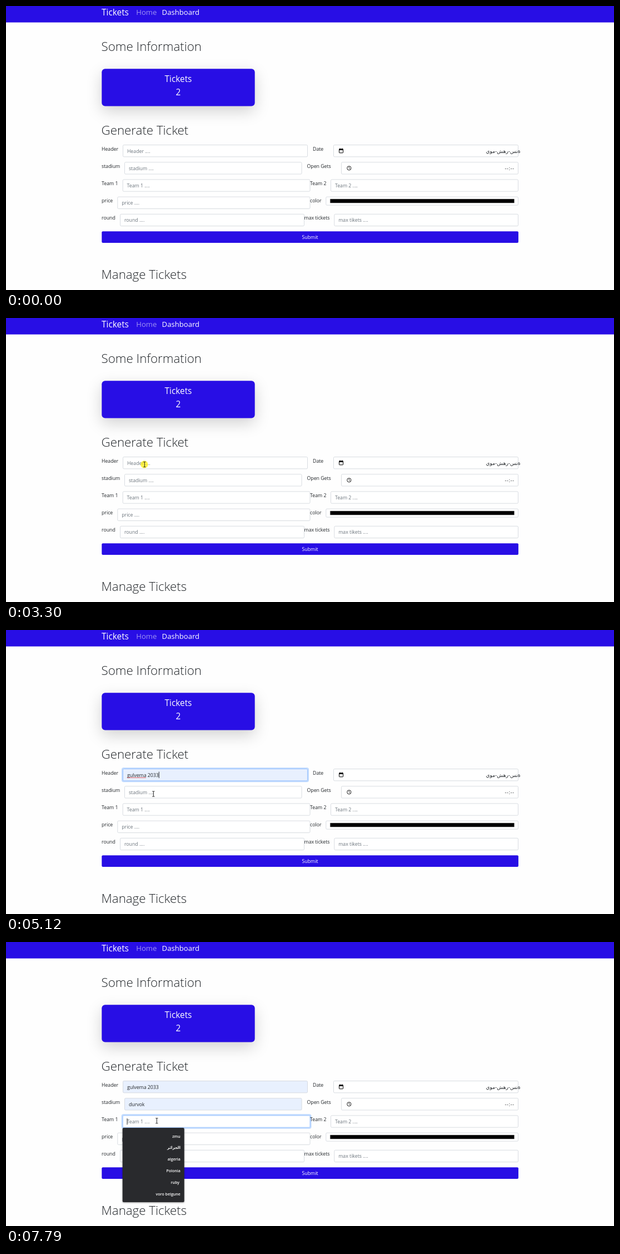
Animation, 1094 px wide and 512 px high, one loop 8 s. Source, as an HTML page with a canvas:

```html
<!DOCTYPE html>
<html lang="en">
<head>
<meta charset="utf-8">
<title>Tickets dashboard</title>
<style>
  html, body { margin: 0; width: 100%; height: 100%; overflow: hidden; background: #fefefe; }
  canvas { display: block; width: 1094px; height: 512px; }
</style>
</head>
<body>
<canvas id="stage"></canvas>
<script>
const W = 1094, H = 512, LOOP = 8000;
const BLUE = '#280ee5', INK = '#212529', HINT = '#6c757d', LINE = '#ced4da', FILLED = '#e8f0fe';
const SANS = '"Open Sans", "Noto Sans", "DejaVu Sans", sans-serif';
const BODY = 8.75, SMALL = 7.3;

const canvas = document.getElementById('stage');
const ctx = canvas.getContext('2d');
const dpr = window.devicePixelRatio || 1;
canvas.width = W * dpr;
canvas.height = H * dpr;

// label, label x, left, right, row, hint
const fields = [
  ['Header', 172, 210.5, 542.5, 0, 'Header ....'],
  ['stadium', 172, 213.5, 532, 1, 'stadium ....'],
  ['Team 1', 172, 210.2, 547, 2, 'Team 1 ....'],
  ['price', 172, 200.8, 547, 3, 'price ....'],
  ['round', 172, 205.5, 536.5, 4, 'round ....'],
  ['Date', 552, 589.5, 921.5, 0, ''],
  ['Open Gets', 541.5, 603.5, 921.5, 1, ''],
  ['Team 2', 547, 584.5, 921.5, 2, 'Team 2 ....'],
  ['color', 547, 575.8, 921.5, 3, ''],
  ['max tickets', 536.5, 590.8, 921.5, 4, 'max tikets ....']
].map(([label, lx, x, right, row, hint]) =>
  ({ label, lx, x, right, hint, y: 250.5 + row * 31.2, h: label === 'color' ? 15 : 21.3 }));

// What happens to the first three fields, in ms
const acts = [
  { focus: 3390, blur: 5650, hover: 4110, pick: 4580, shut: 4650, caret: 4650, spell: 4850,
    list: ['gulvema 2033', 'zefezfffezfezzf', 'ffeefezez', 'gulveam 2022', 'Gulveam 2100', 'gulvema 2032'] },
  { focus: 5650, blur: 7790, hover: 6740, pick: 7110, shut: 7180, caret: 7180, spell: LOOP,
    list: ['durvok', 'humdri', 'dorvunei', 'tolf', 'الباخرة', 'Lorem Ipsum  dddddd'] },
  { focus: 7790, blur: LOOP, hover: LOOP, pick: LOOP, shut: LOOP, caret: 7790, spell: LOOP,
    list: ['zmu', 'الجزائر', 'algeria', 'Polonia', 'ruby ', 'voro belgune'] }
];

const sweeps = [
  { from: 560, to: 1320, pts: [[1075, 461], [985, 320], [830, 160], [640, 60], [470, 8], [382, 34]] },
  { from: 1390, to: 2150, pts: [[364, 31], [320, 15], [252, 10], [200, 9], [203, 10], [213, 8]] },
  { from: 2220, to: 2970, pts: [[245, 15], [350, 42], [470, 88], [505, 142], [430, 212], [320, 250], [252, 262.5]] }
];
const stops = [
  [3030, 249.3, 264, 'beam'], [4040, 273, 279, 'arrow'], [4110, 271, 280.5, 'arrow'],
  [5050, 267, 287, 'beam'], [5120, 265.3, 295.5, 'beam'], [6640, 274, 311, 'arrow'],
  [6740, 272, 314, 'arrow'], [6790, 270, 311.5, 'arrow'], [7320, 271, 319, 'beam'],
  [7380, 271.3, 322.3, 'beam']
];
const clicks = [[3300, 3390], [4440, 4580], [5520, 5650], [6980, 7110], [7730, 7790]];

function text(str, x, y, size, color = INK, weight = 400, align = 'left', family = SANS) {
  ctx.font = `${weight} ${size}px ${family}`;
  ctx.fillStyle = color;
  ctx.textAlign = align;
  ctx.fillText(str, x, y);
  return ctx.measureText(str).width;
}

function box(x, y, w, h, r, fill, stroke, width = 0.8) {
  ctx.beginPath();
  ctx.roundRect(x, y, w, h, r);
  if (fill) { ctx.fillStyle = fill; ctx.fill(); }
  if (stroke) { ctx.strokeStyle = stroke; ctx.lineWidth = width; ctx.stroke(); }
}

function lines(points, color, width) {
  ctx.beginPath();
  points.forEach(([x, y], i) => i ? ctx.lineTo(x, y) : ctx.moveTo(x, y));
  ctx.strokeStyle = color;
  ctx.lineWidth = width;
  ctx.stroke();
}

function drawPage() {
  ctx.fillStyle = '#fefefe';
  ctx.fillRect(0, 0, W, H);
  ctx.fillStyle = BLUE;
  ctx.fillRect(0, 0, W, 29.6);
  text('Tickets', 172, 17, 15.4, '#fff');
  text('Home', 234.3, 16.4, 13.1, 'rgba(255,255,255,.55)');
  text('Dashboard', 280.6, 16.4, 13.1, '#fff');

  ctx.save();
  ctx.shadowColor = 'rgba(0,0,0,.175)';
  ctx.shadowBlur = 27.8 * dpr;
  ctx.shadowOffsetY = 9.3 * dpr;
  box(172.3, 113.3, 275.4, 67.2, 6, BLUE);
  ctx.restore();
  text('Tickets', 310, 136.6, 15.4, '#fff', 400, 'center');
  text('2', 310, 161, 15.4, '#fff', 400, 'center');

  text('Some Information', 171.6, 81.2, 22.3, INK, 300);
  text('Generate Ticket', 171.6, 231.5, 22.3, INK, 300);
  text('Manage Tickets', 171.6, 492, 22.3, INK, 300);

  box(172.3, 406.2, 749.7, 20.8, 2, BLUE);
  text('Submit', 547, 420, BODY, '#fff', 400, 'center');
}

function drawExtras() {
  const [date, time] = [fields[5], fields[6]];
  text('ةنس-رهش-موي', 914.5, date.y + 14, 9, INK, 400, 'right', '"DejaVu Sans", sans-serif');
  box(599.5, 258, 7, 6.8, 0.8, null, '#000', 1);
  ctx.fillStyle = '#000';
  ctx.fillRect(599.2, 257.6, 7.6, 2.2);
  ctx.fillRect(600.4, 256.6, 1, 1.5);
  ctx.fillRect(604.6, 256.6, 1, 1.5);

  ctx.letterSpacing = '0.7px';
  text('--:--', 914.7, time.y + 14.2, BODY, INK, 400, 'right');
  ctx.letterSpacing = '0px';
  ctx.beginPath();
  ctx.arc(617.3, 292.3, 3.6, 0, Math.PI * 2);
  ctx.strokeStyle = '#000';
  ctx.lineWidth = 0.9;
  ctx.stroke();
  lines([[617.3, 289.8], [617.3, 292.5], [619.1, 293.6]], '#000', 0.8);

  box(583.3, 348, 331.2, 7, 0, '#000', '#777', 0.5);
}

function drawField(f, act, t) {
  text(f.label, f.lx, f.y + 10, BODY);
  const focused = act && t >= act.focus && t < act.blur;
  const preview = act && t >= act.hover && t < act.pick;
  const picked = act && t >= act.pick;
  const w = f.right - f.x;
  if (focused) box(f.x - 1.3, f.y - 1.3, w + 2.6, f.h + 2.6, 2.5, null, '#c2dbfe', 2.5);
  box(f.x, f.y, w, f.h, 1.8, preview || picked ? FILLED : '#fff', focused ? '#86b7fe' : LINE);

  const x = f.x + 7.4, base = f.y + 14;
  if (preview) text(act.list[0], x, base - 0.3, SMALL);
  else if (!picked) text(f.hint, x, base, BODY, HINT);
  const end = picked ? x + text(act.list[0], x, base, BODY) : x;
  if (!focused) return;
  if (t >= act.spell) {
    const word = ctx.measureText(act.list[0].split(' ')[0]).width;
    const wave = [];
    for (let i = 0; i <= word; i++) wave.push([x + i, base + 1.8 + (i % 2 ? 0.6 : -0.6)]);
    lines(wave, '#e03030', 0.7);
  }
  if (t >= act.caret) lines([[end + 0.4, f.y + 5], [end + 0.4, f.y + 16.5]], '#000', 0.8);
}

function drawList(f, act, t) {
  if (t < act.focus || t >= act.shut) return;
  const x = f.x - 0.5, y = f.y + f.h + 0.7, pitch = 20.85;
  ctx.save();
  ctx.globalAlpha = t < act.pick ? 1 : 0.5;
  ctx.save();
  ctx.shadowColor = 'rgba(0,0,0,.4)';
  ctx.shadowBlur = 3 * dpr;
  ctx.shadowOffsetY = dpr;
  box(x, y, 111, 134, 2, '#292a2d');
  ctx.restore();
  if (t >= act.hover) {
    ctx.fillStyle = '#3f4042';
    ctx.fillRect(x, y + 4.6, 111, pitch);
  }
  act.list.forEach((item, i) =>
    text(item, x + 104, y + 17.7 + i * pitch, 7, '#fff', 600, 'right'));
  ctx.restore();
}

// Catmull-Rom through the points
function along(pts, u) {
  const s = u * (pts.length - 1);
  const i = Math.min(Math.floor(s), pts.length - 2), k = s - i;
  const at = n => pts[Math.max(0, Math.min(pts.length - 1, n))];
  return [0, 1].map(d => {
    const [a, b, c, e] = [at(i - 1)[d], at(i)[d], at(i + 1)[d], at(i + 2)[d]];
    return b + 0.5 * k * (c - a + k * (2 * a - 5 * b + 4 * c - e + k * (3 * (b - c) + e - a)));
  });
}

function kindAt(x, y) {
  const inNav = y < 22 && ((x > 172 && x < 222) || (x > 234 && x < 349));
  if (inNav) return 'hand';
  return fields.some(f => x > f.x && x < f.right && y > f.y && y < f.y + f.h) ? 'beam' : 'arrow';
}

function cursorAt(t) {
  const stop = stops.filter(s => t >= s[0]).pop();
  if (stop) return stop.slice(1);
  const sweep = sweeps.filter(s => t >= s.from).pop();
  if (!sweep) return null;
  const u = Math.min(1, (t - sweep.from) / (sweep.to - sweep.from));
  const [x, y] = along(sweep.pts, Math.floor(u * 11 + 0.01) / 11);
  return [x, y, kindAt(x, y)];
}

const shapes = {
  arrow: 'M0 0V15L3.4 11.9L5.7 17.2L8 16.2L5.7 11H10.4Z',
  hand: 'M-1 0Q0 -1.4 1 0V5L6 6Q7.5 6.4 7.4 8L6.4 13H0L-4 8Q-4 6 -2.4 7L-1 8.2Z'
};

function drawCursor(t) {
  const cursor = cursorAt(t);
  if (!cursor) return;
  const [x, y, kind] = cursor;
  if (clicks.some(([a, b]) => t >= a && t < b)) {
    ctx.beginPath();
    ctx.arc(x - 0.5, y, 6.7, 0, Math.PI * 2);
    ctx.fillStyle = 'rgba(255,240,0,.7)';
    ctx.fill();
  }
  if (kind === 'beam') {
    lines([[x, y - 4.5], [x, y + 4.5]], '#222', 1);
    for (const d of [-4.6, 4.6]) lines([[x - 2.2, y + d], [x + 2.2, y + d]], '#222', 0.9);
    return;
  }
  ctx.save();
  ctx.translate(x, y);
  const path = new Path2D(shapes[kind]);
  ctx.fillStyle = '#fff';
  ctx.strokeStyle = '#111';
  ctx.lineWidth = 0.8;
  ctx.fill(path);
  ctx.stroke(path);
  ctx.restore();
}

function draw(t) {
  ctx.setTransform(dpr, 0, 0, dpr, 0, 0);
  drawPage();
  fields.forEach((f, i) => drawField(f, acts[i], t));
  drawExtras();
  acts.forEach((act, i) => drawList(fields[i], act, t));
  drawCursor(t);
}

const start = performance.now();
function tick() {
  draw((performance.now() - start) % LOOP);
  requestAnimationFrame(tick);
}
tick();
</script>
</body>
</html>
```
